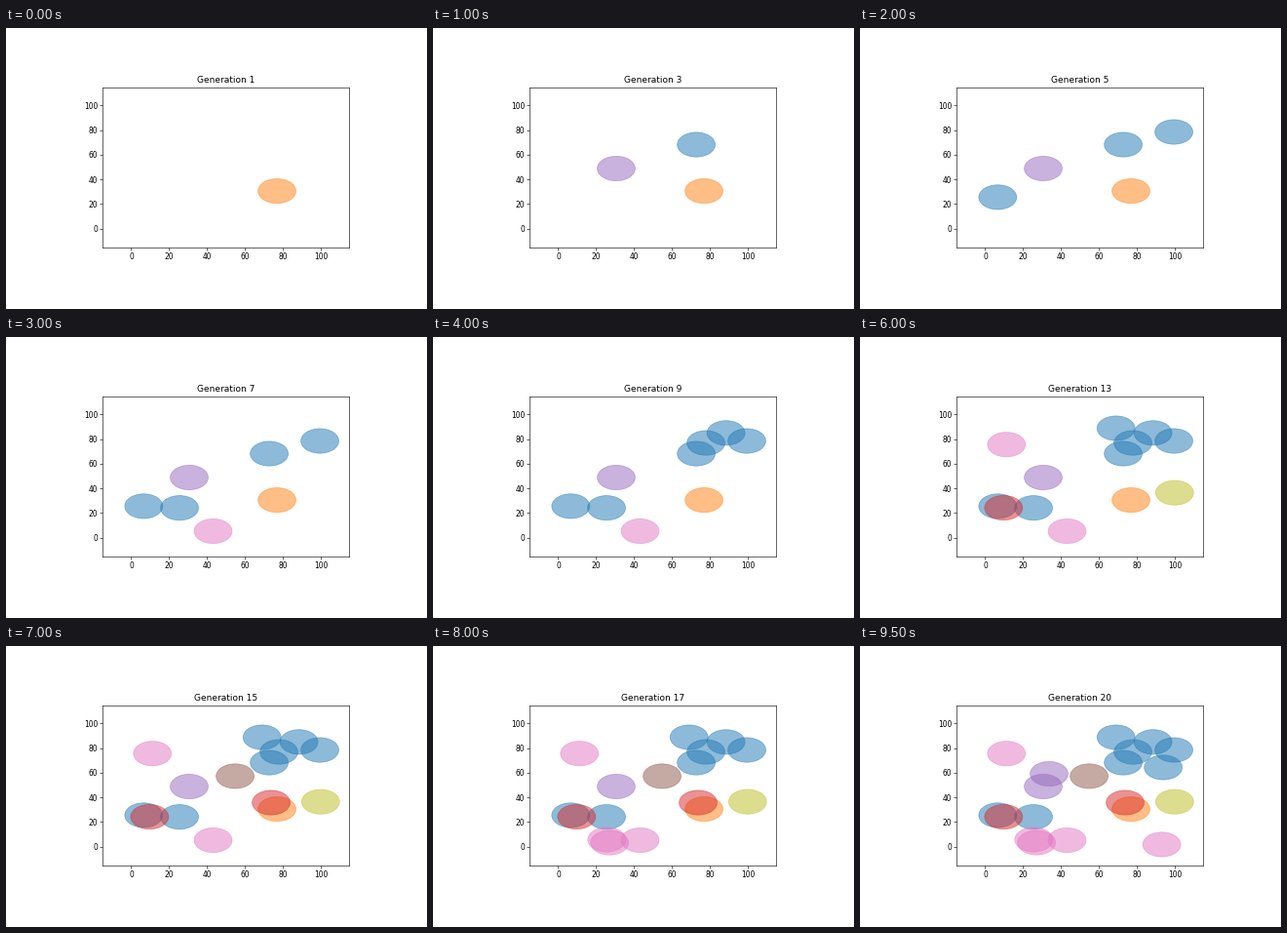
Animation, 432 px wide and 288 px high, one loop 10 s. Source, as a matplotlib script:

```python
import matplotlib.pyplot as plt
from matplotlib.animation import FuncAnimation
from matplotlib.patches import Circle

WIDTH, HEIGHT, DPI = 432, 288, 72
SCALE = 0.755  # everything is drawn at this fraction of the default sizes
RADIUS = 10

# One circle joins per generation: x, y, colour
COLONY = [
    (76.9, 30.5, "orange"),
    (72.8, 68.2, "blue"),
    (30.6, 48.8, "purple"),
    (6.6, 25.5, "blue"),
    (99.5, 78.5, "blue"),
    (25.5, 24.1, "blue"),
    (43.2, 5.2, "pink"),
    (77.9, 76.9, "blue"),
    (88.5, 85.0, "blue"),
    (69.0, 88.8, "blue"),
    (11.2, 75.6, "pink"),
    (99.9, 36.4, "olive"),
    (9.7, 24.2, "red"),
    (73.8, 35.7, "red"),
    (54.8, 57.2, "brown"),
    (25.6, 5.6, "pink"),
    (27.1, 3.2, "pink"),
    (93.9, 64.3, "blue"),
    (33.7, 59.1, "purple"),
    (93.1, 1.7, "pink"),
]

plt.rcParams.update({
    "font.family": "DejaVu Sans",
    "font.size": 10 * SCALE,
    "axes.titlesize": 12 * SCALE,
    "axes.titlepad": 6 * SCALE,
    "axes.linewidth": 0.8 * SCALE,
    "patch.linewidth": SCALE,
})
for axis in ("xtick", "ytick"):
    plt.rcParams.update({
        f"{axis}.major.size": 3.5 * SCALE,
        f"{axis}.major.pad": 3.5 * SCALE,
        f"{axis}.major.width": 0.8 * SCALE,
    })

fig = plt.figure(figsize=(WIDTH / DPI, HEIGHT / DPI), dpi=DPI, facecolor="white")
left, right, top, bottom = 99.3, 352.2, 60.5, 224.5
ax = fig.add_axes([left / WIDTH, 1 - bottom / HEIGHT,
                   (right - left) / WIDTH, (bottom - top) / HEIGHT])
ax.set(xlim=(-15, 115), ylim=(-15, 115),
       xticks=range(0, 101, 20), yticks=range(0, 101, 20))
title = ax.set_title("Generation 1")

circles = [
    ax.add_patch(Circle((x, y), RADIUS, color=f"tab:{color}", alpha=0.5))
    for x, y, color in COLONY
]


def draw(frame):
    title.set_text(f"Generation {frame + 1}")
    for i, circle in enumerate(circles):
        circle.set_visible(i <= frame)
    return [title, *circles]


anim = FuncAnimation(fig, draw, frames=len(COLONY), interval=500,
                     repeat=True, repeat_delay=0)
plt.show()
```
